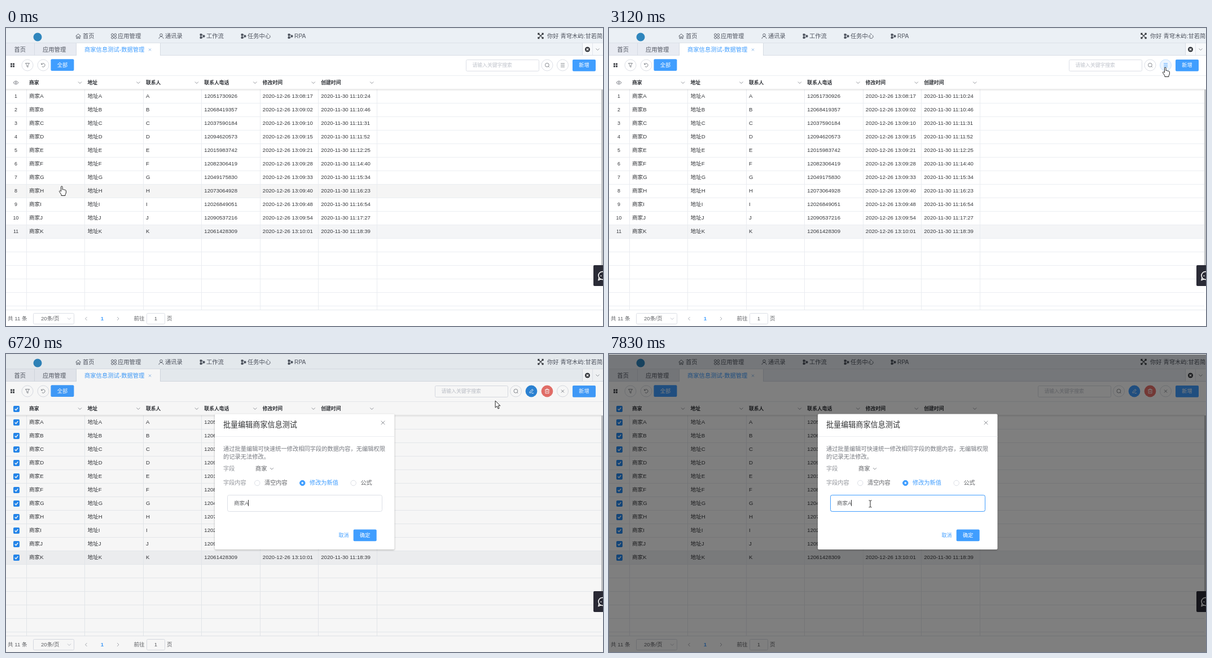
These frames come from a looping animation (1058 px wide and 529 px high, 8 s). An HTML page with a canvas:

```html
<!DOCTYPE html>
<html lang="zh-CN">
<head>
<meta charset="utf-8">
<title>数据管理</title>
<style>
html, body { margin: 0; width: 100%; height: 100%; overflow: hidden; background: #fff; }
canvas { display: block; width: 100vw; height: 100vh; }
</style>
</head>
<body>
<canvas id="stage" width="1058" height="529"></canvas>
<script>
const ctx = document.getElementById('stage').getContext('2d');
const FONT = '"Liberation Sans", "Noto Sans CJK SC", "Noto Sans CJK", sans-serif';
const BLUE = '#409eff', INK = '#36383c', GREY = '#909399', BORDER = '#dcdfe6';
const ROW_TOP = 108.6, ROW_H = 24.05, COL_X = 36, COL_W = 103.45;
const LOOP = 8000, PICK_AT = 3530, CHECK_AT = 4940, DIALOG_AT = 6570;

const phones = ['12051730926', '12068419357', '12037590184', '12094620573', '12015983742', '12082306419',
  '12049175830', '12073064928', '12026849051', '12090537216', '12061428309'];
const modified = ['08:17', '09:02', '09:10', '09:15', '09:21', '09:28', '09:33', '09:40', '09:48', '09:54', '10:01'];
const created = ['10:24', '10:46', '11:31', '11:52', '12:25', '14:40', '15:34', '16:23', '16:54', '17:27', '18:39'];
const rows = phones.map((phone, i) => {
  const letter = String.fromCharCode(65 + i);
  return ['商家' + letter, '地址' + letter, letter, phone, '2020-12-26 13:' + modified[i], '2020-11-30 11:' + created[i]];
});

// Pointer bursts: first step, last step, number of steps
const bursts = [[350, 1130, 11], [1210, 1670, 7], [1820, 2590, 11], [2670, 3440, 10], [3530, 4320, 11],
  [4400, 4540, 3], [5080, 5860, 11], [5960, 6340, 6], [6570, 7280, 10]];
// Pointer path: time, x, y
const path = [[272, 99, 281], [500, 94, 381], [800, 88, 122], [1050, 92, 330], [1287, 89, 162], [1365, 90, 145],
  [1595, 95, 333], [1670, 92, 296], [1820, 120, 280], [2130, 420, 210], [2440, 780, 95], [2590, 854, 79],
  [2670, 880, 72], [3098, 986, 70], [3440, 985, 73], [3530, 940, 80], [3770, 640, 100], [4000, 300, 128],
  [4240, 40, 122], [4320, 20, 107], [4400, 20, 109], [4540, 21, 101], [5080, 40, 106], [5400, 380, 142],
  [5700, 760, 120], [5860, 929, 80], [5960, 931, 74], [6340, 932, 71], [6570, 931, 72], [6649, 920, 74],
  [6728, 867, 83], [6807, 634, 142], [6920, 520, 225], [7060, 468, 262], [7280, 463, 266]];
const shade = [[6649, 0], [6728, .035], [6807, .4], [6900, .5]];

const clamp01 = v => Math.max(0, Math.min(1, v));

function snap(t) {
  let snapped = 0;
  for (const [start, end, count] of bursts) {
    if (t < start) break;
    const step = (end - start) / (count - 1);
    snapped = start + Math.min(count - 1, Math.floor((t - start) / step + .2)) * step;
  }
  return snapped;
}

function along(keys, t) {
  const next = keys.findIndex(k => k[0] > t);
  if (next === 0) return keys[0].slice(1);
  if (next < 0) return keys[keys.length - 1].slice(1);
  const a = keys[next - 1], b = keys[next], u = (t - a[0]) / (b[0] - a[0]);
  return a.slice(1).map((v, i) => v + (b[i + 1] - v) * u);
}

// y is the middle of the line; whole-pixel baselines keep small type sharp
function text(str, x, y, size = 9.6, color = INK, weight = 400, align = 'left') {
  ctx.font = `${weight} ${size}px ${FONT}`;
  ctx.fillStyle = color;
  ctx.textAlign = align;
  ctx.fillText(str, x, Math.round(y - .3 + size * .37));
}
function rect(x, y, w, h, color) {
  ctx.fillStyle = color;
  ctx.fillRect(x, y, w, h);
}
function paint(shape, fill, stroke, width = 1) {
  if (fill) { ctx.fillStyle = fill; ctx.fill(shape); }
  if (stroke) { ctx.strokeStyle = stroke; ctx.lineWidth = width; ctx.stroke(shape); }
}
function box(x, y, w, h, r, fill, stroke) {
  const shape = new Path2D();
  shape.roundRect(x, y, w, h, r);
  paint(shape, fill, stroke);
}
function disc(x, y, r, fill, stroke, width) {
  const shape = new Path2D();
  shape.arc(x, y, r, 0, Math.PI * 2);
  paint(shape, fill, stroke, width);
}
function icon(d, x, y, stroke, fill, width = 1) {
  ctx.save();
  ctx.translate(x, y);
  paint(new Path2D(d), fill, stroke, width);
  ctx.restore();
}
const chevron = (x, y, color = GREY) => icon('M-3-1.5L0 1.5 3-1.5', x, y, color);
const cross = (x, y, r, color, width) =>
  icon(`M${-r} ${-r}L${r} ${r}M${r} ${-r}L${-r} ${r}`, x, y, color, null, width);
function button(label, x, y, w) {
  box(x, y, w, 20.7, 2, BLUE);
  text(label, x + w / 2, y + 10.2, 9.2, '#fff', 500, 'center');
}

const FLOW = 'M-4-4h3v3h-3zM-4 1h3v3h-3zM1-1.5h3v3H1zM-2.5-1v2M-1-2.5h2M-1 2.5h2';
const HOME = 'M-4.5 0L0-4 4.5 0M-3-1V4.2h2V1h2v3.2h2V-1';
const USER = 'M-4 4.5C-3.5-.5 3.5-.5 4 4.5M-2.3-2a2.3 2.3 0 1 0 4.6 0a2.3 2.3 0 1 0-4.6 0';
const FOUR = 'M-4.5-2.5a2 2 0 1 0 4 0a2 2 0 1 0-4 0M.7-2.5a2 2 0 1 0 4 0a2 2 0 1 0-4 0' +
  'M-4.5 2.5a2 2 0 1 0 4 0a2 2 0 1 0-4 0M.7 2.5a2 2 0 1 0 4 0a2 2 0 1 0-4 0';
const EXPAND = 'M-4.5-4.5L4.5 4.5M4.5-4.5L-4.5 4.5M-4.5-2v-2.5h2.5M2-4.5h2.5V-2M4.5 2v2.5H2M-2 4.5h-2.5V2';
const FILTER = 'M-3.5-3.5h7L1 0V3.5L-1 2.5V0z';
const REFRESH = 'M-3-1.5A3.2 3.2 0 1 1-2.2 2.4M-3.4-3.6V-1.2H-1';
const SEARCH = 'M-3.5-.3a3.4 3.4 0 1 0 6.8 0a3.4 3.4 0 1 0-6.8 0M2.2 2.2L3.8 3.8';
const LINES = 'M-3.5-3h7M-3.5 0h7M-3.5 3h7';
const CLOSE = 'M-2.5-2.5L2.5 2.5M2.5-2.5L-2.5 2.5';
const PEN = 'M-3 1.5L1.5-3.5 3.2-2-1.2 3H-3zM.5 3.6H4';
const BIN = 'M-4-2.5h8M-1.5-2.5V-4h3v1.5M-3-2.5V3.8h6V-2.5M-1-.5v2.5M1-.5v2.5';
const EYE = 'M-4.6 0Q0-6 4.6 0Q0 6-4.6 0M-1.4 0a1.4 1.4 0 1 0 2.8 0a1.4 1.4 0 1 0-2.8 0';
const HAND = 'M-1.5 9V1.2a1.3 1.3 0 0 1 2.6 0V6c.5-1 2.3-.7 2.4.4.6-.8 2.1-.5 2.2.6.8-.6 1.7-.1 1.7 1V12l-1.4 2.6V16.5H-1V14.5L-4.4 9.7C-5.2 8.2-3.6 7.2-2.6 8.4z';
const ARROW = 'M0 0V12.2L2.9 9.6 4.9 14.2 6.9 13.3 4.9 8.9H8.8z';
const BEAM = 'M-2.5-6H-.8L0-5.2.8-6H2.5M0-5.2V5.2M-2.5 6H-.8L0 5.2.8 6H2.5';

function drawTopBars() {
  rect(0, 0, 1058, 49, '#ebf0f5');
  rect(0, 26, 1058, 1, '#dce1e8');
  disc(56, 16, 7.5, '#2f86bd');
  [['首页', 128, 136, HOME], ['应用管理', 191, 198, FOUR], ['通讯录', 275, 282, USER],
   ['工作流', 348, 355, FLOW], ['任务中心', 421, 428, FLOW], ['RPA', 504, 511, FLOW]]
    .forEach(([label, ix, x, d]) => {
      icon(d, ix, 14.5, '#505560', d === FLOW ? '#505560' : null, .9);
      text(label, x, 14.5, 10.3, '#505560');
    });
  icon(EXPAND, 947.5, 14, '#303338', null, 1.3);
  text('你好 青穹木屿:甘若简', 959, 14, 10.3, '#505560');

  rect(0, 27, 124, 22, '#e8ebf2');
  rect(124, 27, 149, 22, '#fff');
  [50, 124, 273, 1021].forEach(x => rect(x, 27, 1, 22, '#d6dbe3'));
  rect(0, 48, 124, 1, '#d9dee6');
  rect(274, 48, 784, 1, '#d9dee6');
  rect(1022, 27, 36, 21, '#f7f9fb');
  rect(1039, 27, 1, 21, '#e2e6ec');
  text('首页', 14.5, 38, 10.3, '#505560');
  text('应用管理', 65, 38, 10.3, '#505560');
  text('商家信息测试-数据管理', 139, 38, 10.3, BLUE);
  cross(255, 38.5, 2, '#8cb8e8');
  disc(1030.5, 38, 4.5, '#303338');
  cross(1030.5, 38, 1.8, '#fff', 1.4);
  chevron(1048.5, 38);
}

function drawToolbar(picking, pointer, editHot) {
  [[9, 63], [13, 63], [9, 67], [13, 67]].forEach(([x, y]) => rect(x - 1, y - .5, 3, 3, '#404348'));
  const round = (x, d, fill) => {
    const hot = !fill && pointer.target === x;
    disc(x, 66, fill ? 10.4 : 10, fill || (hot ? '#ecf5ff' : '#fff'), fill ? null : hot ? '#c6e2ff' : BORDER);
    icon(d, x, 66, fill ? '#fff' : hot ? BLUE : '#777b82', null, .9);
  };
  round(38, FILTER);
  round(66, REFRESH);
  button('全部', 79.4, 55.2, 41);
  const inputX = picking ? 760.5 : 815.5;
  box(inputX, 56.5, 129, 20, 2, '#fff', pointer.inSearch ? '#c0c4cc' : BORDER);
  text('请输入关键字搜索', inputX + 11, 66, 8.8, '#bfc3cb');
  if (picking) {
    round(903.5, SEARCH);
    round(931, PEN, editHot ? '#2d86d9' : BLUE);
    round(959, BIN, '#e8706a');
    round(986.5, CLOSE);
  } else {
    round(959, SEARCH);
    round(986.5, LINES);
  }
  button('新增', 1004, 56, 41);
}

function checkbox(y, checked, hot) {
  box(13.5, y - 5, 10, 10, 1, checked ? '#2589f0' : '#fff', checked ? '#2589f0' : hot ? '#a5d0f7' : '#c6c9cf');
  if (checked) icon('M-2.8 0L-.8 2.2 2.8-2.4', 18.5, y, '#fff', null, 1.5);
}

function drawTable(t, picking, hoverRow) {
  const checked = t >= CHECK_AT;
  const lineY = k => Math.round(ROW_TOP + ROW_H * k);
  [hoverRow, 10].forEach(r => {
    if (r >= 0) rect(0, lineY(r), 1055, 24, r === 10 ? '#f4f5f7' : '#f5f5f5');
  });
  for (let k = 1; k <= 16; k++) rect(0, lineY(k), 1055, 1, '#ebeef2');
  for (let c = 0; c < 7; c++) rect(Math.round(COL_X + COL_W * c), 109, 1, 392, '#e9ecf0');

  rect(0, 84, 1058, 1, '#eceef2');
  for (let i = 0; i < 4; i++) rect(0, 108 + i, 1055, 1, `rgba(0,0,0,${.09 - i * .022})`);
  ['商家', '地址', '联系人', '联系人电话', '修改时间', '创建时间'].forEach((label, c) => {
    text(label, 41 + COL_W * c, 97.5, 8.8, '#303338', 700);
    chevron(131 + COL_W * c, 97);
  });
  if (picking) checkbox(97.5, checked);
  else icon(EYE, 17.5, 97, '#73777e', null, .9);

  rows.forEach((cells, r) => {
    const y = ROW_TOP + ROW_H * (r + .5);
    if (picking) checkbox(Math.round(y) + .5, checked, r === 0 && t > 4240);
    else text(r + 1, 17.5, y, 8.8, INK, 400, 'center');
    cells.forEach((cell, c) => text(cell, 41 + COL_W * c, y));
  });
  rect(1055, 109, 3, 313, '#c1c3c6');
}

function drawFooter() {
  rect(0, 501, 1058, 28, '#fff');
  rect(0, 500, 1058, 1, '#e6e9ee');
  text('共 11 条', 3, 516, 9.6, '#606266');
  box(48.5, 506.5, 72, 19, 2, '#fff', BORDER);
  text('20条/页', 62, 516, 9.6, '#606266');
  chevron(112, 516, '#c0c4cc');
  icon('M1.5-3L-1.5 0 1.5 3', 142, 516, '#a8abb2');
  text('1', 170.5, 516, 9.6, BLUE, 700, 'center');
  icon('M-1.5-3L1.5 0-1.5 3', 198.5, 516, '#a8abb2');
  text('前往', 226.5, 516, 9.6, '#606266');
  box(249.5, 506.5, 32, 19, 2, '#fff', BORDER);
  text('1', 265.5, 516, 9.6, '#606266', 400, 'center');
  text('页', 285, 516, 9.6, '#606266');
  box(1041, 421, 20, 37, 2, '#2a2b36');
  disc(1057, 439.5, 7, null, '#fff', 1.6);
  icon('M-2 3L-3 8 2 6', 1053, 439.5, '#fff', null, 1.4);
  disc(1054.5, 440, 1, '#fff');
}

function radio(label, x, on) {
  disc(x, 229, 4.7, on ? BLUE : '#fff', on ? BLUE : BORDER);
  if (on) disc(x, 229, 1.8, '#fff');
  text(label, x + 12.7, 228.5, 10.2, on ? BLUE : '#606266');
}

function drawDialog(t, shown) {
  ctx.save();
  ctx.globalAlpha = shown;
  ctx.translate(0, -15 * (1 - shown));
  ctx.shadowColor = 'rgba(0,0,0,.3)';
  ctx.shadowBlur = 3;
  ctx.shadowOffsetY = 1;
  box(370, 106.5, 318.5, 240.5, 2, '#fff');
  ctx.shadowColor = 'transparent';
  text('批量编辑商家信息测试', 385, 125.5, 13.1, '#303133');
  cross(668, 122, 3.3, GREY);
  rect(370, 146, 318.5, 1, '#ebedf0');
  text('通过批量编辑可快速统一修改相同字段的数据内容，无编辑权限', 385, 168.5, 10.25, '#777a80');
  text('的记录无法修改。', 385, 182.5, 10.25, '#777a80');
  text('字段', 385, 203.5, 10.2, GREY);
  text('商家', 442, 203.5, 10.2, '#606266');
  chevron(471, 203.5);
  text('字段内容', 385, 228.5, 10.2, GREY);
  radio('清空内容', 445.3, false);
  radio('修改为新值', 525.3, true);
  radio('公式', 615.7, false);
  const field = stroke => box(392.5, 250.5, 274, 29, 3, null, stroke);
  field(BORDER);
  ctx.globalAlpha = shown * clamp01((t - 6740) / 180);
  field(BLUE);
  ctx.globalAlpha = shown;
  text('商家A', 404, 265, 9.6, '#606266');
  if (t < 7280 || t >= 7830) rect(429, 259, 1, 11, '#303133');
  text('取消', 589.5, 322, 9, BLUE);
  button('确定', 615.7, 311.6, 41);
  ctx.restore();
}

function locate(x, y, picking, open) {
  if (open) return { kind: x > 392 && x < 667 && y > 251 && y < 280 ? 'beam' : 'arrow' };
  const inBar = y > 56 && y < 77, left = picking ? 760 : 815;
  const circles = picking ? [903.5, 931, 959, 986.5] : [959, 986.5];
  const target = circles.find(c => Math.hypot(x - c, y - 66) <= 10.5);
  const inSearch = inBar && x > left && x < left + 130;
  const row = Math.floor((y - ROW_TOP) / ROW_H);
  const hoverRow = row >= 0 && row < 11 ? row : -1;
  return { kind: inSearch ? 'beam' : target || hoverRow >= 0 ? 'hand' : 'arrow', target, inSearch, hoverRow };
}

function drawPointer(kind, x, y) {
  if (kind === 'beam') icon(BEAM, x, y, '#222');
  else icon(kind === 'hand' ? HAND : ARROW, x, y, '#222', '#fff');
}

function draw(t) {
  const step = snap(t), picking = t >= PICK_AT;
  const [x, y] = along(path, step);
  const shown = clamp01((step - DIALOG_AT) / 150);
  const pointer = locate(x, y, picking, t >= DIALOG_AT);
  rect(0, 0, 1058, 529, '#fff');
  drawTopBars();
  drawToolbar(picking, pointer, pointer.target === 931 || (t > 6340 && t < 6800));
  drawTable(t, picking, pointer.hoverRow ?? -1);
  drawFooter();
  rect(0, 1, 1058, 528, `rgba(0,0,0,${along(shade, step)[0]})`);
  rect(0, 0, 1058, 1, '#dfe3e8');
  if (shown) drawDialog(t, shown);
  drawPointer(pointer.kind, x, y);
}

function tick(now) {
  draw(now % LOOP);
  requestAnimationFrame(tick);
}
requestAnimationFrame(tick);
</script>
</body>
</html>
```
